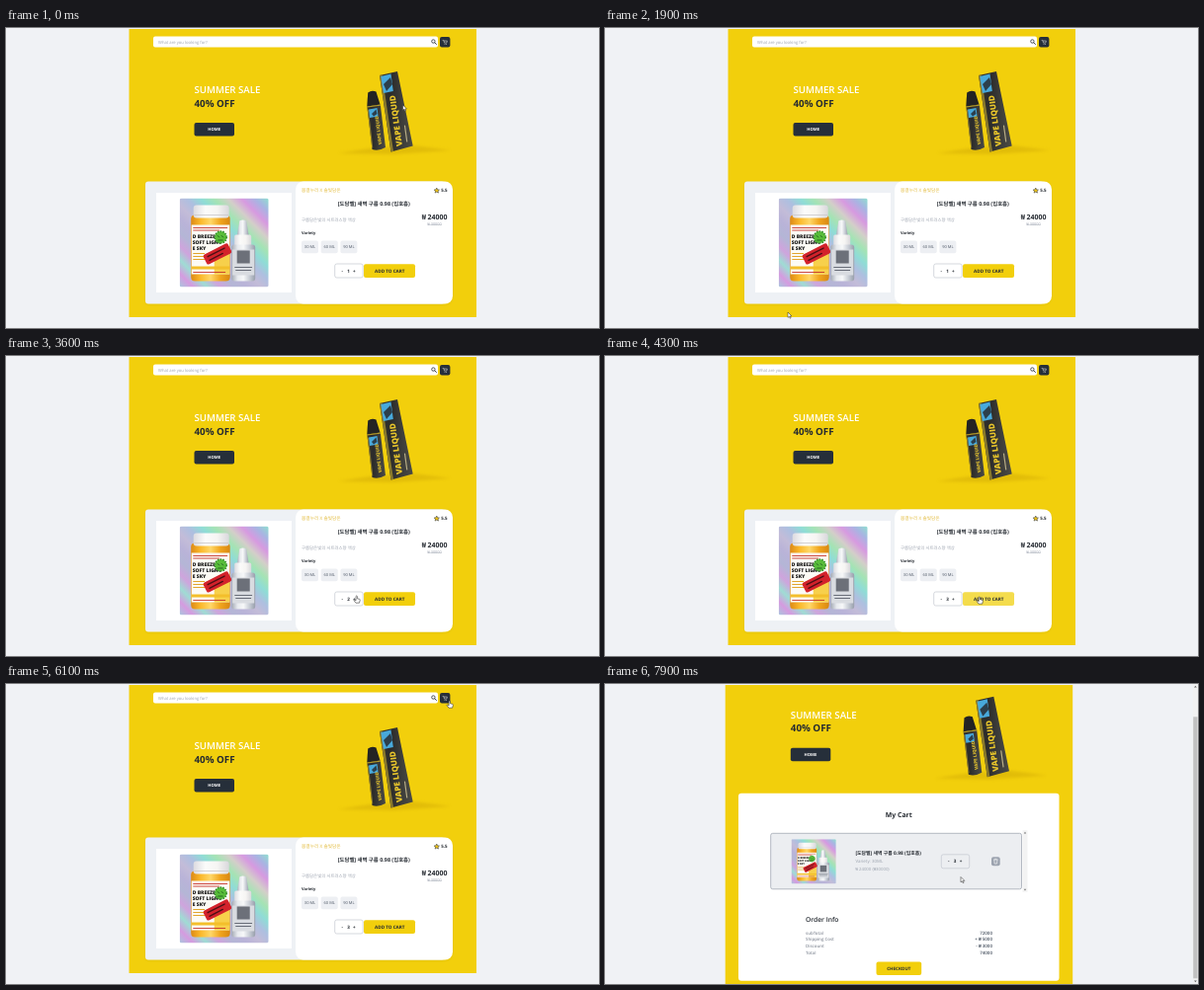
These frames come from a looping animation (600x304 px, 8 s). An HTML page:

```html
<!DOCTYPE html>
<html lang="en">
<head>
<meta charset="utf-8">
<title>Shop and cart</title>
<style>
  html, body { margin: 0; width: 100%; height: 100%; overflow: hidden; background: #f0f2f5; }
  svg { display: block; width: 600px; height: 304px; }
  text { font-family: "Open Sans", "Noto Sans CJK KR", "Noto Sans CJK", sans-serif; text-rendering: geometricPrecision; white-space: pre; }
</style>
</head>
<body>
<svg id="stage" viewBox="0 0 600 304" xmlns="http://www.w3.org/2000/svg"></svg>
<script>
const DARK = '#262f3a', INK = '#252a31', GRAY = '#9ca3af', YELLOW = '#f2cf0c';

const rect = (x, y, w, h, fill, r = 0, extra = '') =>
  `<rect x="${x}" y="${y}" width="${w}" height="${h}" rx="${r}" fill="${fill}" ${extra}/>`;
const text = (x, y, size, str, fill = INK, weight = 400, anchor = 'start', extra = '') =>
  `<text x="${x}" y="${y}" font-size="${size}" fill="${fill}" font-weight="${weight}" text-anchor="${anchor}" ${extra}>${str}</text>`;
const path = (d, fill, extra = '') => `<path d="${d}" fill="${fill}" ${extra}/>`;
const line = (d, color, width) => path(d, 'none', `stroke="${color}" stroke-width="${width}" stroke-linecap="round" stroke-linejoin="round"`);

// Evenly spaced colour stops
const gradient = (id, colors, extra = '') => `<linearGradient id="${id}" ${extra}>${
  colors.map((c, i) => `<stop offset="${i / (colors.length - 1)}" stop-color="${c}"/>`).join('')}</linearGradient>`;

const foilColors = ['#a9c6dd', '#d59be0', '#9fdcd4', '#cfa4dd', '#b4b6d6', '#b9b3d8', '#c3bcd8',
  '#aebfe0', '#8fdcd6', '#a5e3b4', '#d3cfc9', '#d79ae0', '#a8b4e2', '#8fe0cf'];

const defs = `<defs>
  <clipPath id="view"><rect y="1" width="600" height="303"/></clipPath>
  <clipPath id="photoEdge"><rect width="90" height="90" rx="2"/></clipPath>
  ${gradient('foil', foilColors, 'x1="0" y1="1" x2="1" y2="0"')}
  ${gradient('amber', ['#dd8a14', '#fbb92c', '#ffd768', '#f0a51e', '#d98812'])}
  ${gradient('clear', ['#a3a9b4', '#e6e9ed', '#f7f8f9', '#c9ced6', '#979eab'])}
  ${gradient('white', ['#dcdbe0', '#fbfbfa', '#f6f5f3', '#d9d8dc'])}
  ${gradient('carton', ['#35342f', '#2b2b2a', '#3d3d3a', '#4a4a45'])}
  <filter id="blur" x="-20%" y="-60%" width="140%" height="220%"><feGaussianBlur stdDeviation="1.6"/></filter>
  <filter id="soft" x="-10%" y="-10%" width="120%" height="125%"><feDropShadow dx="0" dy=".6" stdDeviation=".8" flood-opacity=".08"/></filter>
  <g id="photo" clip-path="url(#photoEdge)">${photo()}</g>
</defs>`;

function photo() {
  const jar = rect(11.5, 17, 39.5, 67, 'url(#amber)', 4)
    + rect(14, 7, 36, 13, 'url(#white)', 3) + line('M15 17H49', '#c9c8cc', .8)
    + rect(12, 27, 38.5, 50, '#fcfbf5') + rect(35, 54, 15.5, 23, '#f7d04b')
    + line('M14 30H48M14 32.5H40', '#c7352d', .9)
    + text(13, 40, 5, 'D BREEZE', '#191919', 800) + text(13, 46, 5, 'SOFT LIGHT', '#191919', 800)
    + text(13, 52, 5, 'E SKY', '#191919', 800)
    + line('M14 56H25M14 59H24M14 62H25', '#e2a52c', 1)
    + rect(12, 69, 38.5, 3, '#f3bf2b') + line('M14 75H46', '#c7352d', .9);
  const virus = '<circle cx="41.5" cy="39.5" r="6" fill="#58bd3a" stroke="#2f8a2a" stroke-width="1.6" stroke-dasharray="1.4 1.3"/>'
    + line('M38.5 38L40 39.5M42.5 38L44 39.5M39 42.5H43.5', '#1f5a20', .9);
  const sticker = `<g transform="rotate(-27 38 56)">${rect(24, 51, 28, 11, '#d3222b', 2)}${line('M28 54.5H47M28 58.5H43', '#4d1015', 1.4)}</g>`;
  const dropper = path('M60.5 23Q64 21 67.5 23L70 38H58Z', 'url(#clear)')
    + rect(55.5, 37, 17, 12, 'url(#white)', 1.5)
    + rect(52.5, 47, 24, 37, 'url(#clear)', 3)
    + rect(53.5, 52, 22, 26, '#d9dce1') + rect(58, 53, 13, 13, '#6c7079')
    + line('M56 70H73M57 73H72', '#686d78', 1);
  return rect(0, 0, 90, 90, 'url(#foil)') + jar + virus + sticker + dropper;
}

function heroBottles() {
  const tilted = (x, y, size, angle, color) =>
    text(x, y, size, 'VAPE LIQUID', color, 800, 'start', `transform="rotate(${angle} ${x} ${y})"`);
  return path('M336 127L368 122L412 119L450 124L392 128Z', '#b98f00', 'opacity=".28" filter="url(#blur)"')
    + path('M378 48L396 44L411.7 119.5L389.5 125.5Z', 'url(#carton)')
    + path('M378 48L380.5 47.5L392 125L389.5 125.5Z', '#8a7a2c')
    + path('M379.3 49L389.5 46.5L391.8 64L382 66Z', '#48a9db')
    + path('M382 57L389 50L391 57L385 64Z', '#2c3f4c')
    + tilted(401, 119.5, 8.2, -98, '#e9c62b')
    + line('M405.7 115L403.5 99', '#b8ad86', 1.2)
    + path('M366.2 65.5Q370 62.5 374.5 64.5L378.5 77.5L365.3 79.5Z', '#232323')
    + path('M365.3 79.5L378.8 77.5L384 121Q377 125 370.5 123Z', 'url(#carton)')
    + line('M365.6 80L378.7 78.2', '#c8aa28', .9) + line('M366.3 83L370.7 121', '#a8912c', .8)
    + path('M367 82.5L375.5 81L376.6 89.5L368 91Z', '#48a9db')
    + path('M370 87L374.5 82.5L375.5 87L372 89.5Z', '#2c3f4c')
    + tilted(380.2, 118, 4.6, -97, '#dabb2f');
}

function hero() {
  return rect(149, 8.6, 288, 11, '#fff', 2)
    + text(154, 16, 4.2, 'What are you looking for?', GRAY)
    + `<circle cx="432.4" cy="13.5" r="1.7" fill="none" stroke="${INK}" stroke-width=".8"/>` + line('M433.8 14.9L435.4 16.5', INK, .9)
    + rect(439, 9, 10.4, 10.4, DARK, 2)
    + line('M442 12.4H442.8L443.6 15.1H445.8L446.4 13H443.2', '#f1f1f1', .5)
    + '<circle cx="444" cy="16.4" r=".45" fill="#fff"/><circle cx="445.6" cy="16.4" r=".45" fill="#fff"/>'
    + text(190.5, 66.2, 9.7, 'SUMMER SALE', '#fff', 600)
    + text(190.5, 79.7, 9.8, '40% OFF', INK, 700)
    + rect(190.5, 96, 40.5, 13.5, DARK, 2)
    + text(210.7, 104.4, 4.2, 'HOME', '#fff', 700, 'middle')
    + heroBottles();
}

const counter = (x, y, id) =>
  rect(x, y, 28.4, 14, 'none', 2, 'stroke="#c3c8d0" stroke-width=".7"')
  + text(x + 7.5, y + 8.6, 4.6, '-', INK, 700, 'middle')
  + text(x + 13.8, y + 8.6, 4.6, '3', INK, 700, 'middle', `id="${id}"`)
  + text(x + 19.7, y + 8.6, 4.6, '+', INK, 700, 'middle');

function shopPage() {
  const sizes = ['30 ML', '60 ML', '90 ML'].map((label, i) =>
    rect(299 + i * 19.7, 215.5, 17, 12.7, '#edeff3', 2)
    + text(307.5 + i * 19.7, 223.4, 4, label, '#4b5563', 400, 'middle')).join('');
  return rect(124.5, 1, 351.5, 292, YELLOW) + hero()
    + `<g filter="url(#soft)">${rect(141, 155.5, 303, 124, '#eef1f5', 3)}${rect(293, 155.5, 159, 124, '#fff', 8)}</g>`
    + rect(152, 167, 137, 101, '#fff')
    + '<use href="#photo" x="175.7" y="172.5"/>'
    + text(299, 166, 4.7, '봄결누리 X 솔빛담온', '#e2bb3d')
    + path('M435.8 162L436.6 163.8L438.5 164L437.1 165.2L437.5 167.1L435.8 166.1L434.1 167.1L434.5 165.2L433.1 164L435 163.8Z', '#f0c419', `stroke="${INK}" stroke-width=".5"`)
    + text(446.6, 166.3, 4.5, '5.5', INK, 700, 'end')
    + text(372.3, 179.7, 5.4, '[도담벨] 새벽 구름 0.98 (입호흡)', INK, 700, 'middle')
    + text(299, 195.7, 4.4, '구름담은빛의 시트러스향 액상', GRAY)
    + text(446.6, 193.8, 7, '₩ 24000', INK, 700, 'end')
    + text(440.8, 200.2, 3.9, '₩ 30000', GRAY, 400, 'end', 'text-decoration="line-through"')
    + text(299, 208.5, 4, 'Variety', INK, 700)
    + sizes + counter(332.7, 239, 'count')
    + rect(362, 239.3, 52, 13.7, YELLOW, 2, 'id="add"')
    + text(388.3, 247.8, 4.6, 'ADD TO CART', INK, 700, 'middle');
}

function cartPage() {
  const order = [['subTotal', '72000'], ['Shipping Cost', '+ ₩ 5000'], ['Discount', '- ₩ 3000'], ['Total', '74000']];
  const rows = order.map(([label, value], i) =>
    text(203, 284.8 + i * 6.9, 4.4, label, '#8a909b', 600)
    + text(392, 284.8 + i * 6.9, 4.5, value, '#4b5563', 600, 'end')).join('');
  return rect(121.7, 1, 351.5, 340, YELLOW)
    + `<g transform="translate(-2.7 0)">${hero()}</g>`
    + rect(135, 142, 324.5, 190, '#fff', 3)
    + text(297.3, 166, 6.9, 'My Cart', INK, 700, 'middle')
    + rect(167.7, 182.5, 253.8, 56.5, '#eceef1', 2, 'stroke="#a4aab4" stroke-width=".8"')
    + rect(422.5, 179.5, 5, 62.5, '#f3f3f3')
    + path('M425 181L426.2 182.6H423.8ZM425 240.6L426.2 239H423.8Z', '#777')
    + '<use href="#photo" transform="translate(188.5 188.4) scale(.503)"/>'
    + text(253.5, 204.5, 4.9, '[도담벨] 새벽 구름 0.98 (입호흡)', INK, 700)
    + text(253.5, 212.5, 4.4, 'Variety: 30ML', GRAY)
    + text(253.5, 220.5, 4.3, '₩ 24000 (₩30000)', GRAY)
    + counter(340.3, 204, 'cartCount')
    + rect(391, 206.5, 8.7, 9, GRAY, 2)
    + line('M393.4 209.2H397.3M394.6 208.5H396.1M393.9 209.8L394.2 213.3H396.5L396.8 209.8', '#fff', .6)
    + text(203, 272.4, 6.7, 'Order Info', INK, 600)
    + rows
    + rect(274.5, 312.7, 45.7, 13.5, YELLOW, 2)
    + text(297.3, 321.1, 4.5, 'CHECKOUT', INK, 700, 'middle');
}

document.getElementById('stage').innerHTML = defs + rect(0, 0, 600, 304, '#f0f2f5')
  + `<g clip-path="url(#view)"><g id="shop">${shopPage()}</g><g id="cart">${cartPage()}</g></g>`
  + `<g id="bar">${rect(594.7, 0, 5.3, 304, '#f1f1f1')}${rect(595.2, 0, 4.3, 265, '#c1c1c1', 0, 'id="thumb"')}
     ${path('M597.4 1.8L598.8 3.6H596ZM597.4 302.2L598.8 300.4H596Z', '#666')}</g>`
  + path('M0 0V5.4L1.3 4.2L2.2 6.2L3.1 5.8L2.2 3.9H3.9Z', '#fff', `id="arrow" stroke="#222" stroke-width=".5"`)
  + path('M-.7 .5Q0 -.6 .7 .5V2.8L3 3.3Q3.6 3.6 3.5 4.6L2.8 7.2H-.8L-2.7 4.6Q-2.6 3.7 -1.7 4.1L-.7 4.9Z', '#fff', `id="hand" stroke="#222" stroke-width=".55"`);

const el = id => document.getElementById(id);
const LOOP = 8000, STEP = 100;
const OPEN_CART = 6500, SCROLL_START = 7500, SCROLL_TIME = 200, SCROLL = 31.2;

// Pointer stops: time, x, y
const stops = [
  [0, 401.5, 78], [300, 487, 130], [900, 186, 282], [1400, 130, 297], [1800, 185, 288], [2000, 185, 288],
  [2700, 335, 251], [3200, 354.7, 243], [4000, 354.7, 243], [4500, 392, 244.5], [5400, 392, 244.5],
  [5800, 474, 60], [6100, 448.8, 17], [6500, 448.8, 17], [7200, 392, 134.5], [7400, 392, 134.5], [7800, 360, 195.5], [8000, 360, 195.5]
];
// Clickable areas: left, top, right, bottom
const addArea = [362, 239, 414, 253];
const shopAreas = [addArea, [349, 239, 361, 253], [439, 9, 450, 20]];

const ease = p => p * p * (3 - 2 * p);
const clamp = p => Math.max(0, Math.min(1, p));
const inside = ([x, y], [l, t, r, b]) => x >= l && x <= r && y >= t && y <= b;
const show = (id, on) => el(id).setAttribute('visibility', on ? 'visible' : 'hidden');

function pointerAt(t) {
  const i = stops.findIndex(s => s[0] > t);
  const [t0, x0, y0] = stops[i - 1], [t1, x1, y1] = stops[i];
  const p = ease((t - t0) / (t1 - t0));
  return [x0 + (x1 - x0) * p, y0 + (y1 - y0) * p];
}

function draw(t) {
  const inCart = t >= OPEN_CART;
  const pointer = pointerAt(t);
  const hand = !inCart && shopAreas.some(area => inside(pointer, area));
  const scrolled = ease(clamp((t - SCROLL_START) / SCROLL_TIME));

  show('shop', !inCart);
  show('cart', inCart);
  show('bar', inCart);
  show('arrow', !hand);
  show('hand', hand);

  el('count').textContent = t < 3400 ? 1 : t < 3900 ? 2 : 3;
  el('add').setAttribute('fill', inside(pointer, addArea) ? '#f4dc4c' : YELLOW);
  el('cart').setAttribute('transform', `translate(0 ${-SCROLL * scrolled})`);
  el('thumb').setAttribute('y', 5.3 + 28 * scrolled);
  for (const id of ['arrow', 'hand']) el(id).setAttribute('transform', `translate(${pointer})`);
}

const start = performance.now();
function tick() {
  const t = (performance.now() - start) % LOOP;
  draw(Math.floor(t / STEP) * STEP);
  requestAnimationFrame(tick);
}
tick();
</script>
</body>
</html>
```
